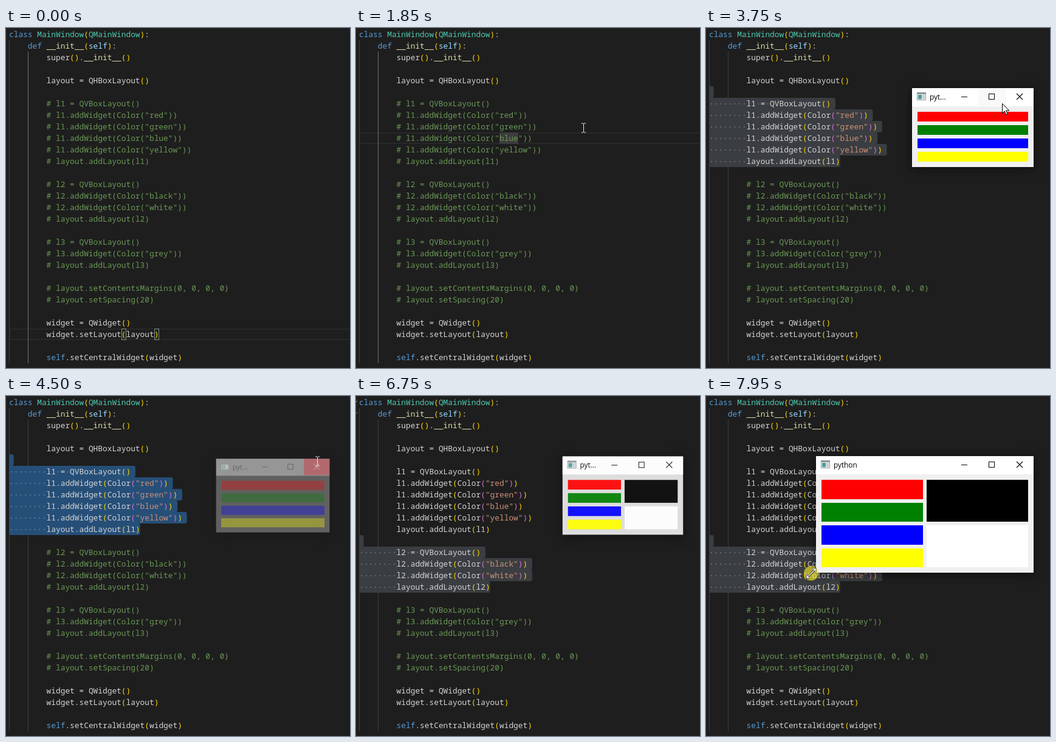
Recreate the animation shown at these times as an HTML page with a canvas. Size 566x560 px, loop 8000 ms.

```html
<!DOCTYPE html>
<html lang="en">
<head>
<meta charset="utf-8">
<title>Nested layouts</title>
<style>
html, body { margin: 0; width: 566px; height: 560px; overflow: hidden; background: #1e1e1e; }
canvas { display: block; }
</style>
</head>
<body>
<canvas id="stage" width="566" height="560"></canvas>
<script>
const ctx = document.getElementById('stage').getContext('2d');
const LOOP = 8000, STEP = 50, LEFT = 5, TOP = 1, CHAR = 7.7, LINE = 19;
const CODE_FONT = '12.83px "Noto Sans Mono", "DejaVu Sans Mono", monospace';
const TITLE_FONT = '11.8px "Open Sans", "Noto Sans", sans-serif';

const CODE = `class MainWindow(QMainWindow):
    def __init__(self):
        super().__init__()

        layout = QHBoxLayout()

        # l1 = QVBoxLayout()
        # l1.addWidget(Color("red"))
        # l1.addWidget(Color("green"))
        # l1.addWidget(Color("blue"))
        # l1.addWidget(Color("yellow"))
        # layout.addLayout(l1)

        # l2 = QVBoxLayout()
        # l2.addWidget(Color("black"))
        # l2.addWidget(Color("white"))
        # layout.addLayout(l2)

        # l3 = QVBoxLayout()
        # l3.addWidget(Color("grey"))
        # layout.addLayout(l3)

        # layout.setContentsMargins(0, 0, 0, 0)
        # layout.setSpacing(20)

        widget = QWidget()
        widget.setLayout(layout)

        self.setCentralWidget(widget)`.split('\n');

const WORD_COLORS = {
  class: '#569cd6', def: '#569cd6', self: '#569cd6',
  MainWindow: '#4ec9b0', QMainWindow: '#4ec9b0', __init__: '#dcdcaa'
};
const BRACKETS = ['#ffd700', '#da70d6', '#179fff'];

// Rows selected by a drag, when the drag runs, when they are uncommented and coloured
const BLOCKS = [
  { first: 5, last: 11, press: 2050, end: 2350, until: 4850, edit: 2750, paint: 2900 },
  { first: 12, last: 16, press: 4850, end: 5200, until: LOOP, edit: 6000, paint: 6100 }
];
const WINDOWS = [
  { open: 1000, close: 1700, columns: [] },
  { open: 3300, close: 4400, columns: [['red', 'green', 'blue', 'yellow']] },
  { open: 6650, close: 9000, columns: [['red', 'green', 'blue', 'yellow'], ['black', 'white']] }
];
const PRESSES = [[150, 300], [1600, 1700], [2050, 2400], [4200, 4400], [4850, 5200], [7500, LOOP]];
const CARETS = [[200, 700], [2050, 3100], [4850, 5700], [6000, 6450]];
const PATH = [
  [50, 292, 215], [200, 267, 177], [300, 267, 177], [550, 367, 180], [950, 367, 180],
  [1200, 391, 174], [1450, 512, 108], [1700, 512, 108], [2000, 236, 219], [2050, 236, 219],
  [2350, 3, 108], [2400, 3, 108], [2500, 12, 109], [3300, 12, 109], [3750, 487, 124],
  [3900, 512, 107], [4500, 512, 107], [4800, 236, 315], [4850, 236, 315], [5200, 6, 240],
  [5450, -12, 256], [6800, -12, 256], [7400, 331, 230], [7500, 331, 230], [7700, 294, 324],
  [7800, 294, 324], [7950, 173, 292]
];

const within = (t, spans) => spans.some(([a, b]) => t >= a && t < b);
const clamp = (v, lo, hi) => Math.min(hi, Math.max(lo, v));
const colX = col => LEFT + col * CHAR;
const rowY = row => TOP + row * LINE;

function rect(color, x, y, w, h) {
  ctx.fillStyle = color;
  ctx.fillRect(x, y, w, h);
}

function strokeLine(color, width, ...points) {
  ctx.strokeStyle = color;
  ctx.lineWidth = width;
  ctx.beginPath();
  points.forEach(([x, y]) => ctx.lineTo(x, y));
  ctx.stroke();
}

function mouseAt(t) {
  const i = PATH.findIndex(p => p[0] > t);
  if (i < 0) return PATH[PATH.length - 1].slice(1);
  if (i === 0) return [-50, -50];
  const [t0, x0, y0] = PATH[i - 1], [t1, x1, y1] = PATH[i];
  const k = (t - t0) / (t1 - t0), e = k * k * (3 - 2 * k);
  return [x0 + (x1 - x0) * e, y0 + (y1 - y0) * e];
}

function codeAt(t) {
  return CODE.map((line, row) =>
    BLOCKS.some(b => row > b.first && row <= b.last && t >= b.edit) ? line.replace('# ', '') : line);
}

function selectionAt(t, lines) {
  const block = BLOCKS.find(b => t >= b.press && t < b.until);
  if (!block) return null;
  const { first, last, end } = block;
  let row = first, col = 0;
  if (t < end) {
    const [x, y] = mouseAt(t);
    row = clamp(Math.floor((y - TOP) / LINE), first, last);
    col = clamp(Math.round((x - LEFT) / CHAR), 0, lines[row].length);
  }
  return { row, col, last };
}

function drawSelection(sel, lines, color) {
  for (let row = sel.row; row <= sel.last; row++) {
    const text = lines[row], from = row === sel.row ? sel.col : 0;
    const to = text.length + (row < sel.last ? 1 : 0);
    ctx.fillStyle = color;
    ctx.beginPath();
    ctx.roundRect(colX(from), rowY(row), (to - from) * CHAR, LINE, [0, 3, 3, 0]);
    ctx.fill();
    for (let c = from; c < text.length; c++)
      if (text[c] === ' ') rect('rgba(227,228,226,.25)', colX(c) + 3, rowY(row) + 9, 2, 2);
  }
}

function drawLine(text, row, plain) {
  let depth = 0;
  for (const match of text.matchAll(/#.*|"[^"]*"|\w+|[()]|[^\w()"#]+/g)) {
    const token = match[0];
    let color = WORD_COLORS[token] || '#d4d4d4';
    if (token[0] === '#') color = '#6a9955';
    else if (token[0] === '"') color = '#ce9178';
    else if (token === 'self' && text.includes('def ')) color = '#9cdcfe';
    else if (token === '(') color = plain ? color : BRACKETS[depth++];
    else if (token === ')') color = plain ? color : BRACKETS[--depth];
    ctx.fillStyle = color;
    ctx.fillText(token, colX(match.index), rowY(row) + 14);
  }
}

function drawEditor(t) {
  const lines = codeAt(t), sel = selectionAt(t, lines);
  const blurred = WINDOWS.some(w => t >= w.open && t < w.close);
  rect('#1e1e1e', 0, 0, 566, 560);

  if (!sel) {
    ctx.strokeStyle = '#282828';
    ctx.lineWidth = 2;
    ctx.strokeRect(6, rowY(t < 200 ? 26 : 9) + 1, 570, LINE - 2);
    if (t >= 1000) rect('#3c3c3c', colX(30), rowY(9), 4 * CHAR, LINE);
  }
  const active = !sel || lines[sel.row].length > 0;
  rect('#404040', 5, rowY(1), 1, 532);
  rect(active ? '#707070' : '#404040', 36, rowY(2), 1, 513);
  if (sel) drawSelection(sel, lines, blurred ? '#3a3d41' : '#264f78');

  if (t < 200) for (const col of [24, 31]) {
    const x = Math.round(colX(col)) + .5, y = rowY(26) + .5;
    rect('rgba(0,100,0,.1)', x, y, 7, 18);
    ctx.strokeStyle = '#888';
    ctx.lineWidth = 1;
    ctx.strokeRect(x, y, 7, 18);
  }

  ctx.font = CODE_FONT;
  lines.forEach((text, row) => drawLine(text, row,
    BLOCKS.some(b => row > b.first && row <= b.last && t >= b.edit && t < b.paint)));

  if (within(t, CARETS)) {
    const { row, col } = sel || { row: 9, col: 34 };
    rect('#aeafad', Math.round(colX(col)), rowY(row), 2, LINE);
  }
  if (t >= 5200 && t < 6900)
    for (const y of [8, 27]) strokeLine('#a0a0a0', 1, [-2, y + 4], [2, y]);
}

function drawWindow(win, t) {
  const fadeIn = clamp((t - win.open) / 140, 0, 1), fadeOut = clamp((t - win.close) / 150, 0, 1);
  const shown = (1 - (1 - fadeIn) ** 2) * (1 - fadeOut);
  if (!shown) return;

  const [mx, my] = mouseAt(t), resizing = t >= 7500;
  const right = 539, top = 99, body = 129;
  const left = resizing ? Math.round(mx + 8) : 339;
  const bottom = resizing ? Math.round(my - 1) : 229;
  const width = right - left, height = bottom - top;
  const cx = left + width / 2, cy = top + height / 2, scale = .9 + .1 * shown;

  ctx.save();
  ctx.globalAlpha = shown;
  ctx.translate(cx, cy);
  ctx.scale(scale, scale);
  ctx.translate(-cx, -cy);
  ctx.shadowColor = 'rgba(0,0,0,.55)';
  ctx.shadowBlur = 16;
  ctx.shadowOffsetY = 3;
  rect('#f0f0f0', left, top, width, height);
  ctx.shadowColor = 'transparent';
  rect('#fff', left, top, width, body - top);

  // App icon and title
  rect('#8b9296', left + 8, 106, 15, 13);
  rect('#f4f6f6', left + 9, 109, 13, 9);
  rect('#4d9a98', left + 10, 110, 6, 7);
  rect('#c4cccf', left + 17, 110, 4, 7);
  ctx.font = TITLE_FONT;
  ctx.fillStyle = '#000';
  ctx.fillText(width < 212 ? 'pyt...' : 'python', left + 29, 118);

  // Caption buttons
  const onBar = my >= top && my < body;
  const overClose = onBar && mx >= 494 && mx < right;
  if (overClose) rect(within(t, PRESSES) ? '#f1707a' : '#e81123', 494, top, 45, 29);
  else if (onBar && mx >= 448 && mx < 494) rect('#f9f9f9', 448, top, 46, 29);
  strokeLine('#000', 1, [420, 113.5], [430, 113.5]);
  ctx.strokeRect(465.5, 108.5, 9, 9);
  const cross = overClose ? '#fff' : '#000';
  strokeLine(cross, 1.1, [511, 108], [521, 118]);
  strokeLine(cross, 1.1, [521, 108], [511, 118]);

  const margin = 9, gap = 6, count = win.columns.length;
  const colW = (width - 2 * margin - gap * (count - 1)) / count;
  win.columns.forEach((colors, c) => {
    const rows = colors.length, h = (bottom - body - 2 * margin - gap * (rows - 1)) / rows;
    colors.forEach((color, r) => {
      const y = Math.round(body + margin + r * (h + gap));
      const end = Math.round(body + margin + r * (h + gap) + h);
      rect(color, Math.round(left + margin + c * (colW + gap)), y, Math.round(colW), end - y);
    });
  });
  ctx.restore();
}

const ARROW = new Path2D('M.5 .5V16.5L4.2 13L6.8 18.8L9.2 17.8L6.7 12H11.8Z');
const RESIZE = new Path2D('M-6.5 6.5L6.5 -6.5M1.5 -7H7V-1.5M-7 1.5V7H-1.5');
const BEAM = new Path2D('M-3.5 -7.5H-1L0 -6.5L1 -7.5H3.5M0 -6.5V6.5M-3.5 7.5H-1L0 6.5L1 7.5H3.5');

function drawMouse(t) {
  const [x, y] = mouseAt(t);
  ctx.save();
  ctx.translate(Math.round(x), Math.round(y));
  if (within(t, PRESSES)) {
    ctx.fillStyle = 'rgba(255,240,30,.62)';
    ctx.beginPath();
    ctx.arc(0, 0, 12, 0, 7);
    ctx.fill();
  }
  const overWindow = x >= 339 && x < 539 && y >= 99 && y < 229 &&
    WINDOWS.some(w => t >= w.open && t < w.close);
  ctx.lineWidth = 1;
  if (t >= 7350) {
    ctx.strokeStyle = '#222';
    ctx.lineWidth = 3;
    ctx.stroke(RESIZE);
    ctx.strokeStyle = '#fff';
    ctx.lineWidth = 1.4;
    ctx.stroke(RESIZE);
  } else if (overWindow) {
    ctx.fillStyle = '#fff';
    ctx.fill(ARROW);
    ctx.strokeStyle = '#000';
    ctx.stroke(ARROW);
  } else {
    ctx.translate(.5, .5);
    ctx.strokeStyle = '#e8e8e8';
    ctx.stroke(BEAM);
  }
  ctx.restore();
}

const start = performance.now();
function draw() {
  const t = Math.floor(((performance.now() - start) % LOOP) / STEP) * STEP;
  drawEditor(t);
  WINDOWS.forEach(win => t >= win.open && drawWindow(win, t));
  drawMouse(t);
  requestAnimationFrame(draw);
}
draw();
</script>
</body>
</html>
```
